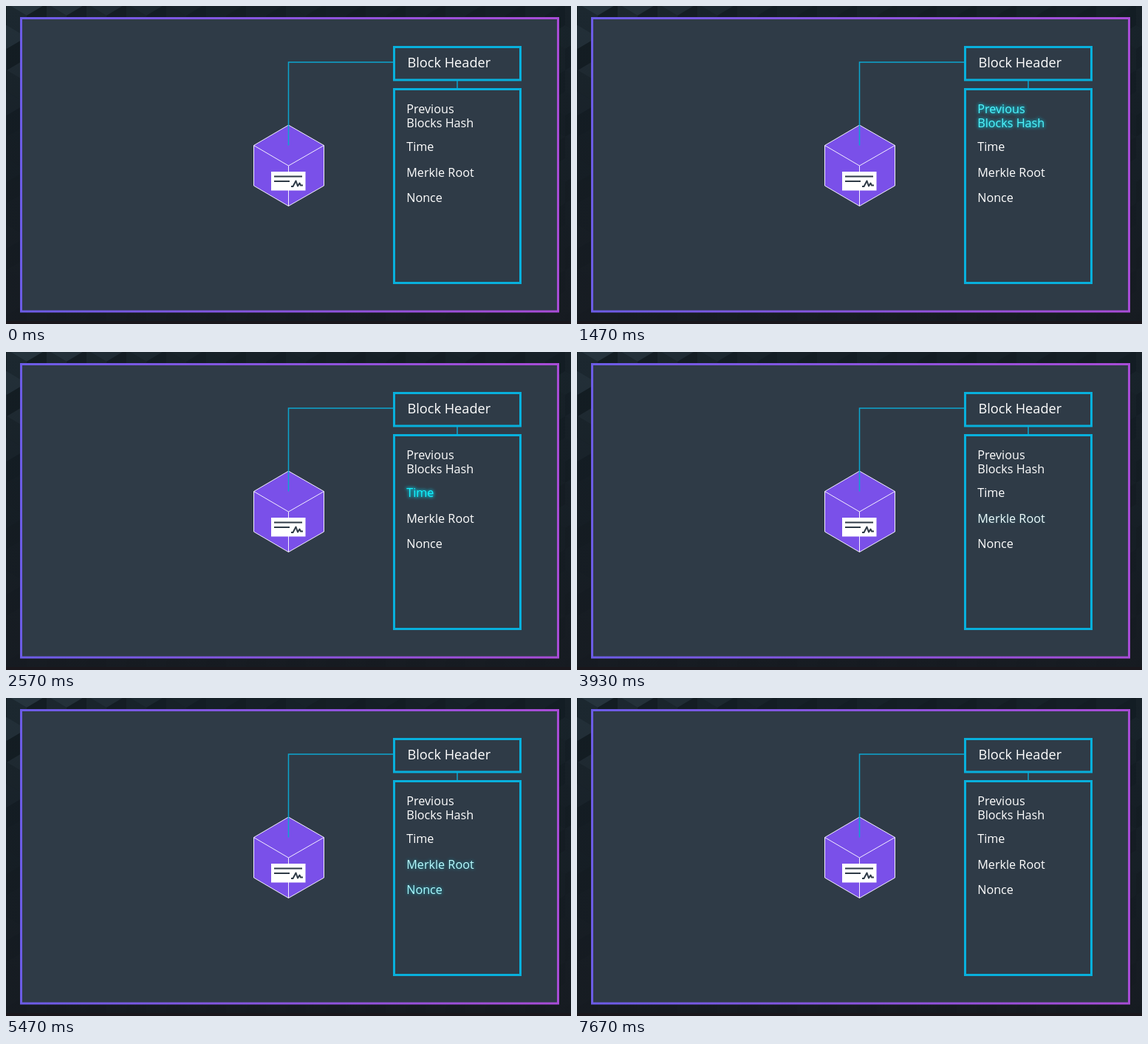
Write an HTML page that moves like this. It is 765 by 430 pixels and loops after 8 s.

```html
<!DOCTYPE html>
<html lang="en">
<head>
<meta charset="utf-8">
<title>Block Header</title>
<style>
  html, body { margin: 0; width: 100%; height: 100%; overflow: hidden; background: #19232b; }
  svg { display: block; width: 765px; height: 430px; }
  text { font-family: "Open Sans", "Noto Sans", sans-serif; fill: #fff; }
  .item { font-size: 16.2px; }
  .glow { fill: #00e8ff; stroke: #00d8f0; stroke-width: 1.6; filter: blur(2.2px); opacity: 0; }
  .box { fill: none; stroke: #08b0dc; stroke-width: 3; }
  .wire { fill: none; stroke: #0ca5cf; stroke-width: 1.5; }
  .ink { fill: none; stroke: #2f3b47; stroke-width: 2; }
</style>
</head>
<body>
<svg viewBox="0 0 765 430">
  <defs>
    <linearGradient id="edge">
      <stop offset="0" stop-color="#6c5ce6"/>
      <stop offset="1" stop-color="#a84cd6"/>
    </linearGradient>
    <linearGradient id="shade" x1="0" y1="0" x2="0" y2="1">
      <stop offset="0" stop-color="#151b22" stop-opacity="0"/>
      <stop offset="1" stop-color="#171a20" stop-opacity=".75"/>
    </linearGradient>
  </defs>

  <rect width="765" height="430" fill="#19232b"/>
  <g id="tiles"></g>
  <rect width="765" height="430" fill="url(#shade)"/>
  <rect y="426" width="765" height="4" fill="#1a171c"/>

  <rect x="20.5" y="16.5" width="727" height="396.5" fill="#2f3b47" stroke="url(#edge)" stroke-width="3"/>

  <path d="M382.5 161 430.5 188.5V243L382.5 270.5 335.5 243V188.5Z" fill="#7a50e9" stroke="#f3efff"/>
  <path d="M335.5 188.5 382.5 216 430.5 188.5M382.5 216V270.5" fill="none" stroke="#f3efff"/>
  <rect x="359" y="224" width="46.5" height="25.5" fill="#fff"/>
  <path class="ink" d="M363 230.5H401M363 237H384"/>
  <path class="ink" stroke-linejoin="round" d="M386 244H388.5L392.5 236.5 395 243.5 397.5 239.5 399 242.5H402"/>

  <path class="wire" d="M382.5 188.5V76H525M611 100V112"/>
  <rect class="box" x="525.5" y="55.5" width="171" height="44.5"/>
  <rect class="box" x="525.5" y="112.5" width="171" height="262"/>
  <text x="543.4" y="83.3" font-size="18.2">Block Header</text>
  <g id="list"></g>
</svg>

<script>
const NS = "http://www.w3.org/2000/svg";
const LOOP = 8000;

function add(parent, tag, attrs, text = "") {
  const el = document.createElementNS(NS, tag);
  for (const key in attrs) el.setAttribute(key, attrs[key]);
  el.textContent = text;
  return parent.appendChild(el);
}

// Backdrop: dim isometric cubes, lighter towards the top left corner.
const tiles = document.getElementById("tiles");
let seed = 11;
const rand = () => (seed = (seed * 16807) % 2147483647) / 2147483647;

function face(points, light) {
  const rgb = [21, 31, 38].map((c, i) => Math.round(c + light * [22, 26, 29][i]));
  add(tiles, "polygon", { points: points.join(" "), fill: `rgb(${rgb})` });
}

const W = 27, H = 16, D = 29;
for (let row = -1; row < 11; row++) {
  for (let col = -1; col < 16; col++) {
    const x = col * W * 2 + (row % 2 ? W : 0) + 28;
    const y = row * (H + D) - 3;
    const lit = Math.max(0, 1 - Math.hypot(x, y * 1.6) / 270);
    const jitter = rand() * 0.14;
    face([x, y - H, x + W, y, x, y + H, x - W, y], lit * 0.85 + jitter);
    face([x - W, y, x, y + H, x, y + H + D, x - W, y + D], lit * 0.35 + jitter * 0.6);
    face([x + W, y, x, y + H, x, y + H + D, x + W, y + D], jitter * 0.4 - 0.1);
  }
}

// Each entry: lines as [text, baseline], then fade in start/end, fade out start/end.
const items = [
  { lines: [["Previous", 144.6], ["Blocks Hash", 163.7]], times: [130, 800, 1300, 1970] },
  { lines: [["Time", 196]], times: [1900, 2570, 3000, 3670] },
  { lines: [["Merkle Root", 231]], times: [3880, 4600, 5000, 5670] },
  { lines: [["Nonce", 265]], times: [5230, 5900, 6400, 7070] }
];

function pulse(el, prop, off, on, times) {
  const marks = [0, ...times, LOOP];
  const frames = marks.map((ms, i) => ({
    offset: ms / LOOP,
    [prop]: i === 2 || i === 3 ? on : off
  }));
  const anim = el.animate(frames, { duration: LOOP, iterations: Infinity });
  anim.startTime = document.timeline.currentTime;
}

const list = document.getElementById("list");
for (const { lines, times } of items) {
  for (const [text, y] of lines) {
    const at = { x: 542.2, y };
    const glow = add(list, "text", { ...at, class: "item glow", "aria-hidden": true }, text);
    const label = add(list, "text", { ...at, class: "item" }, text);
    pulse(glow, "opacity", 0, 0.75, times);
    pulse(label, "fill", "#ffffff", "#14f4ff", times);
  }
}
</script>
</body>
</html>
```
